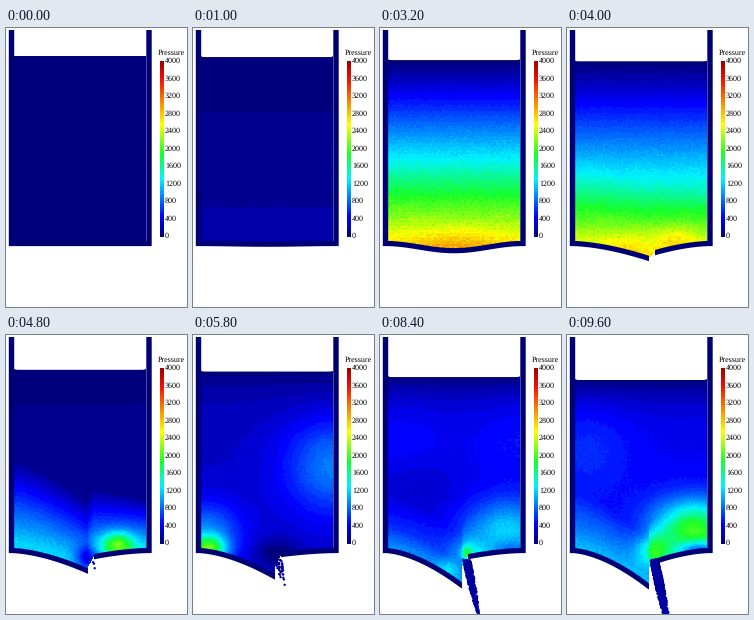
A matplotlib script that plays this animation: 181x279 px, repeating every 9.8 s.

```python
import numpy as np
import matplotlib.pyplot as plt
from matplotlib.animation import FuncAnimation
from matplotlib.colors import LinearSegmentedColormap

W, H, DPI = 181, 279, 64
FRAMES, STEP = 49, 200
P_MAX = 4000
NAVY = np.array([0, 0, 0.46])
BREAK = 4.0          # seconds until the floor cracks
LEFT_TIP, RIGHT_TIP = 82, 88

plt.rcParams["font.family"] = "Liberation Serif"
plt.rcParams["text.hinting"] = "none"
rng = np.random.default_rng(7)

cmap = LinearSegmentedColormap.from_list("pressure", [
    (0, "#00007c"), (0.11, "#0000ff"), (0.33, "#00f4ff"), (0.47, "#18ff28"),
    (0.64, "#ffff00"), (0.9, "#f01000"), (1, "#a00000")], N=512)

X, Y = np.meshgrid(np.arange(W) + 0.5, np.arange(H) + 0.5)
GRAIN = np.kron(rng.normal(size=(140, 91)), np.ones((2, 2)))[:H, :W]
ROWS = np.sin(Y * 2 * np.pi / 3.6)

# After the crack: time, base, floor glow, glow reach,
# then spots as (x, y, x radius, y radius, strength)
STAGES = [
    (4.8, 50, 1150, 85, [(112, 209, 16, 12, 1000), (82, 224, 13, 12, -750)]),
    (5.8, 260, 0, 40, [(140, 130, 50, 50, 650), (16, 214, 17, 13, 1300),
                       (12, 200, 36, 32, 700), (84, 218, 22, 14, -300)]),
    (7.2, 400, 450, 22, [(35, 153, 48, 34, -370), (140, 95, 45, 45, 230),
                         (70, 234, 13, 11, 650), (86, 217, 5, 6, 1000)]),
    (9.6, 430, 650, 55, [(128, 190, 42, 27, 1350), (86, 216, 16, 16, 800),
                         (132, 215, 18, 9, -900), (20, 105, 45, 55, 200)]),
]


def surface(t):
    return 28 + 1.1 * t + 0.07 * t ** 2


def left_floor(t):
    s = (t - BREAK) / 5.6
    drop = 15 + 21 * (1 - (1 - s) ** 2)
    return 215.5 + drop * np.clip((X[0] - 5) / (LEFT_TIP - 5), 0, 1) ** 1.65


def right_floor(t):
    drop = 3.5 + 7.5 * ((t - 6.6) / 3) ** 2
    v = np.clip((143 - X[0]) / (143 - RIGHT_TIP), 0, 1)
    return 215.5 + drop * v ** 1.7


def whole_floor(t):
    u = np.clip((X[0] - 5) / 138, 0, 1)
    return 215.5 + 0.7 * t ** 2 * np.sin(np.pi * u) ** 2


def band(line):
    """Coverage of a plate drawn along a centre line."""
    dist = np.abs(Y - line) / np.hypot(1, np.gradient(line))
    return np.clip(3.1 - dist, 0, 1) * (X > 3) * (X < 145.5)


def floor(t):
    """Lower edge of the water and coverage of the floor plates."""
    if t < BREAK:
        line = whole_floor(t)
        return line, band(line)
    left, right = left_floor(t), right_floor(t)
    x = X[0]
    mouth = np.interp(x, [LEFT_TIP, RIGHT_TIP],
                      [min(left[LEFT_TIP], 232), right[RIGHT_TIP]])
    line = np.where(x < LEFT_TIP, left, np.where(x > RIGHT_TIP, right, mouth))
    plates = band(left) * (X < LEFT_TIP) + band(right) * (X > RIGHT_TIP)
    return line, plates


def spot(cx, cy, rx, ry, amp):
    return amp * np.exp(-((X - cx) / rx) ** 2 - ((Y - cy) / ry) ** 2)


def still_field(t, top):
    amp = min(142 * t ** 2.5, 2700)
    depth = np.clip((Y - top) / (214 - top), 0, 1.1)
    return amp * depth ** 1.1 + spot(76, 224, 48, 22, 0.12 * amp)


def stage_field(stage, top, line):
    _, base, glow, reach, spots = stage
    reach = reach * (1 - 0.45 * (X - 8) / 132)
    p = base + glow * np.clip(1.1 - (line - Y) / reach, 0, 1)
    p = p + sum(spot(*s) for s in spots)
    return p * (1 - np.exp(-np.clip(Y - top, 0, H) / 25))


def pressure(t, top, line):
    if t <= 3.8:
        p = still_field(t, top)
    else:
        n = next(i for i, s in enumerate(STAGES) if t <= s[0] + 1e-6)
        p1 = stage_field(STAGES[n], top, line)
        if n:
            t0, p0 = STAGES[n - 1][0], stage_field(STAGES[n - 1], top, line)
        else:
            t0, p0 = 3.8, still_field(3.8, top)
        p = p0 + (p1 - p0) * (t - t0) / (STAGES[n][0] - t0)
    stripes = 0.012 * ROWS if t < BREAK else 0
    p = p * (1 + 0.02 * GRAIN * min(t / 3, 1) + stripes)
    return np.round(np.clip(p, 0, P_MAX) / 75) * 75


def paint(img, cover, color):
    c = np.clip(cover, 0, 1)[..., None]
    return img * (1 - c) + color * c


def picture(t):
    img = np.ones((H, W, 3))
    top = surface(t)
    line, plates = floor(t)
    corner = np.clip(np.minimum(X - 8, 140 - X), 0, 99)
    skin = Y - top + min(t, 1) * np.exp(-corner)
    inside = (X > 7.5) & (X < 140.5) & (Y < line)
    water = np.clip(skin + 0.5, 0, 1) * inside
    colors = cmap(pressure(t, top, line) / P_MAX)[..., :3]
    img = paint(img, water, colors)
    img = paint(img, water * np.clip(2 - skin, 0, 1) * 0.85, NAVY)
    img = paint(img, plates, NAVY)

    tall = (Y > 2) & (Y < 218)
    for middle in (5.5, 143):
        img = paint(img, tall * np.clip(3.2 - np.abs(X - middle), 0, 1), NAVY)
    return img


# Droplets leave the crack at a growing rate
N_DROPS = 1100
born = np.linspace(0, 1, N_DROPS) ** 0.4
side = rng.uniform(-1, 1, N_DROPS)
lag = rng.uniform(-2, 2, N_DROPS)
drop_colors = cmap(rng.uniform(0, 0.06, N_DROPS))


def drops(t):
    age = t - (4.3 + 5.3 * born)
    fall = 14 * age + 1.3 * age ** 2 + lag
    spread = 3.5 + fall * (0.17 * born - 0.09)
    x = 85 + 2.5 * born + 0.24 * fall + side * np.maximum(spread, 0.5)
    return np.column_stack([x, np.where(age > 0, 226 + fall, -50)])


fig = plt.figure(figsize=(W / DPI, H / DPI), dpi=DPI, facecolor="white")
ax = fig.add_axes([0, 0, 1, 1])
ax.axis("off")
screen = ax.imshow(picture(0), extent=(0, W, H, 0), aspect="auto",
                   interpolation="nearest")
jet = ax.scatter(*drops(0).T, s=7, c=drop_colors, linewidths=0)

BAR_TOP, BAR_END = 34, 209.5
ax.imshow(np.linspace(1, 0, 256)[:, None], cmap=cmap, aspect="auto",
          extent=(154, 157.5, BAR_END, BAR_TOP), zorder=3)
ax.text(152.2, 27, "Pressure", size=9, va="baseline")
for value in range(0, P_MAX + 1, 400):
    ax.text(158.8, 210.4 - 175.3 * value / P_MAX, str(value), size=9,
            va="baseline")
ax.set_xlim(0, W)
ax.set_ylim(H, 0)


def update(i):
    t = i * STEP / 1000
    screen.set_data(np.clip(picture(t), 0, 1))
    jet.set_offsets(drops(t))
    return screen, jet


anim = FuncAnimation(fig, update, frames=FRAMES, interval=STEP,
                     repeat=True, repeat_delay=0)
plt.show()
```
